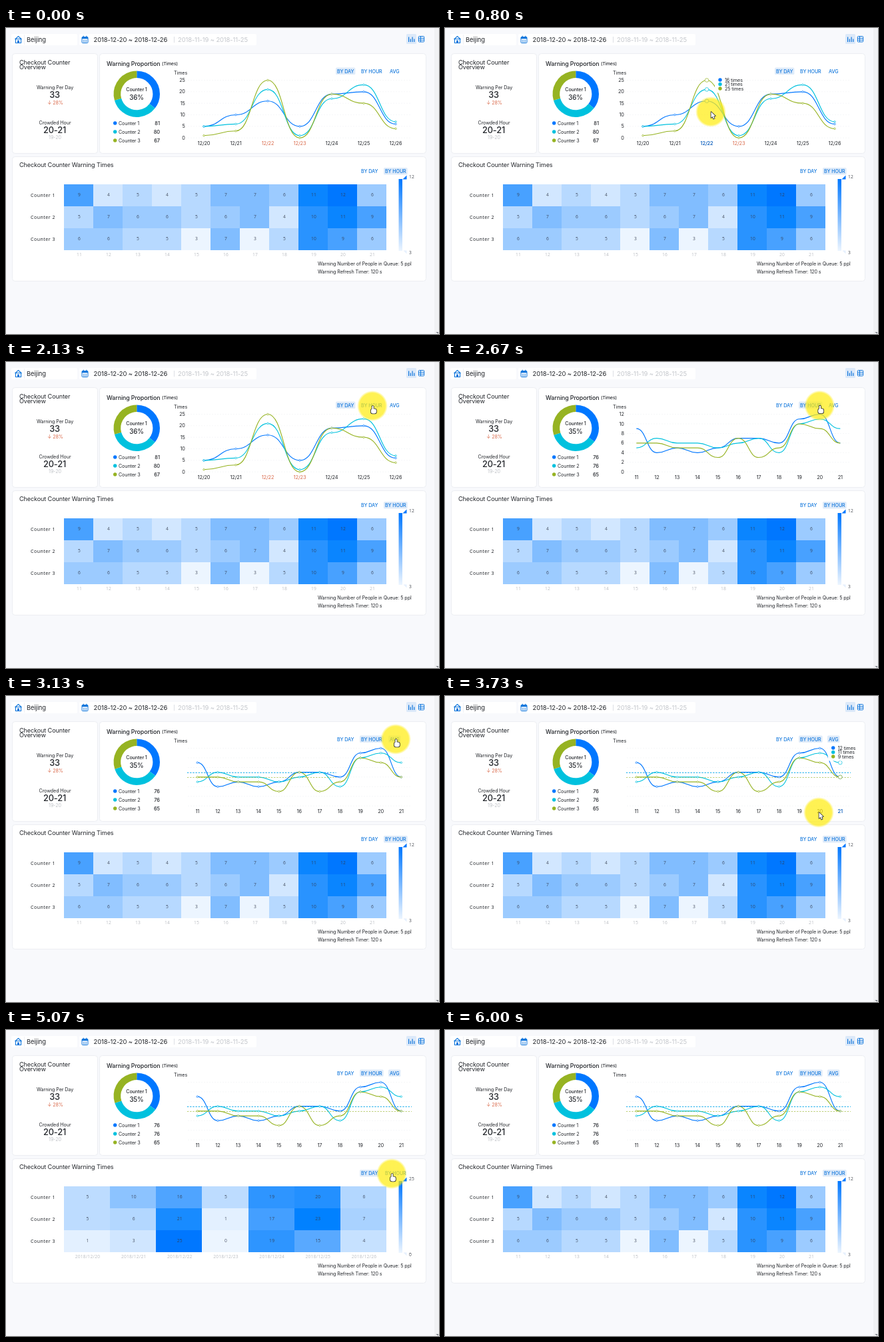
These frames come from a looping animation (650x460 px, 6130 ms). An HTML page with a canvas:

```html
<!DOCTYPE html>
<html lang="en">
<head>
<meta charset="utf-8">
<title>Checkout counter dashboard</title>
<style>
  html, body { margin: 0; width: 100%; height: 100%; overflow: hidden; background: #f8f9fc; }
  canvas { display: block; width: 650px; height: 460px; }
</style>
</head>
<body>
<canvas id="stage" width="650" height="460"></canvas>
<script>
const ctx = document.getElementById('stage').getContext('2d');
const LOOP = 6130, TICK = 1000 / 15;
const UI = 'Inter, sans-serif', GRID = '"Noto Sans", sans-serif';
const SMALL = 7.15, TITLE = 9.1, TRACKING = -0.013;
const INK = '#24272c', MUTED = '#bfc2c7', RED = '#d9694a', LINK = '#1277dc';
const COLORS = ['#0077ff', '#00c1de', '#96b322'];

const range = n => [...Array(n).keys()];
const sum = row => row.reduce((a, b) => a + b, 0);
const mix = (a, b, p) => a + (b - a) * p;
const phase = (t, from, to) => Math.max(0, Math.min(1, (t - from) / (to - from)));
const ease = p => p * p * (3 - 2 * p);

// Warnings per counter, by day and by hour
const day = {
  rows: [[5, 10, 16, 5, 19, 20, 6], [5, 6, 21, 1, 17, 23, 7], [1, 3, 25, 0, 19, 15, 4]],
  label: i => '12/' + (20 + i), date: i => '2018/12/' + (20 + i),
  weekend: i => i === 2 || i === 3,
  x0: 297, step: 48, min: 0, max: 25, tick: 5
};
const hour = {
  rows: [[9, 4, 5, 4, 5, 7, 7, 6, 11, 12, 6], [5, 7, 6, 6, 5, 6, 7, 4, 10, 11, 9],
         [6, 6, 5, 5, 3, 7, 3, 5, 10, 9, 6]],
  label: i => 11 + i, date: i => 11 + i, weekend: () => false,
  x0: 287.3, step: 30.6, min: 3, max: 12, tick: 2
};

// Pointer moves: start, end, and the point reached
const ENTRY = { x: 625, y: 171 };
const MOVES = [
  [266, 733, 399, 126], [933, 1600, 437, 128], [1600, 2133, 550, 66], [2533, 2867, 585, 65],
  [3533, 3733, 561, 175], [3733, 4200, 540, 216], [4733, 5067, 579, 216], [5667, 6000, 676, 221]
];

function pointer(t) {
  if (t < 266 || t > 5990) return null;
  return MOVES.reduce((c, [from, to, x, y]) => {
    const p = ease(phase(t, from, to));
    return { x: mix(c.x, x, p), y: mix(c.y, y, p) };
  }, ENTRY);
}

function text(s, x, cy, size = SMALL, o = {}) {
  ctx.font = `${o.weight || 400} ${size}px ${o.font || UI}`;
  ctx.letterSpacing = (o.space ?? TRACKING * size) + 'px';
  ctx.textAlign = o.align || 'left';
  ctx.fillStyle = o.color || INK;
  ctx.fillText(s, x, cy + size * 0.36);
}

const centered = (s, x, cy, size, o) => text(s, x, cy, size, { align: 'center', ...o });
const gridText = (s, x, cy, size, o) => text(s, x, cy, size, { font: GRID, space: 0.2, ...o });

function line(color, width) {
  ctx.strokeStyle = color;
  ctx.lineWidth = width;
  ctx.stroke();
}

function box(x, y, w, h, fill, r = 0, stroke) {
  ctx.beginPath();
  ctx.roundRect(x, y, w, h, r);
  ctx.fillStyle = fill;
  ctx.fill();
  if (stroke) line(stroke, 1);
}

function dot(x, y, r, fill, stroke, width) {
  ctx.beginPath();
  ctx.arc(x, y, r, 0, Math.PI * 2);
  ctx.fillStyle = fill;
  ctx.fill();
  if (stroke) line(stroke, width);
}

function rule(x, y, end, color, width, dash) {
  ctx.setLineDash(dash);
  ctx.beginPath();
  ctx.moveTo(x, y);
  ctx.lineTo(end, y);
  line(color, width);
  ctx.setLineDash([]);
}

function triangle(x, y, dx, dy, fill) {
  ctx.beginPath();
  ctx.moveTo(x, y);
  ctx.lineTo(x + dx, y);
  ctx.lineTo(x + dx, y + dy);
  ctx.fillStyle = fill;
  ctx.fill();
}

function button(label, x, cy, on) {
  ctx.font = `500 ${SMALL}px ${UI}`;
  ctx.letterSpacing = TRACKING * SMALL + 'px';
  if (on) box(x - 2, cy - 5.5, ctx.measureText(label).width + 4, 10.5, '#dfebf9', 1.5);
  text(label, x, cy, SMALL, { color: LINK, weight: 500 });
}

function header() {
  box(8, 9, 99, 17, '#fff', 2);
  box(110, 9, 266, 17, '#fff', 2);
  box(27, 10, 1, 15, '#eff1f5');

  // Home
  ctx.beginPath();
  ctx.moveTo(13.5, 17);
  ctx.lineTo(18.5, 12.5);
  ctx.lineTo(23.5, 17);
  ctx.rect(14.5, 16.5, 8, 6);
  line(LINK, 1.2);
  box(17, 18.5, 3, 4, LINK);
  text('Beijing', 31, 17.5, 9.4);

  // Calendar
  box(114, 13.5, 9, 9, '#fff', 1.2, LINK);
  box(114, 13.5, 9, 2.8, LINK);
  for (const i of range(2)) box(115.7 + i * 4.5, 11.8, 1.2, 2, LINK);
  for (const i of range(6)) box(115.8 + i % 3 * 2.1, 18 + (i > 2 ? 2 : 0), 1.2, 1.2, LINK);
  text('2018-12-20 ~ 2018-12-26', 131.5, 17.5, 9.45);
  box(252, 13, 0.8, 9, '#d5d8dd');
  text('2018-11-19 ~ 2018-11-25', 258, 17.5, 9.45, { color: '#c4c7cc' });

  // Chart and table switches
  box(601, 9, 15, 15, '#dce9f9', 1.5);
  for (const i of range(4)) {
    const h = i % 2 ? 4.5 : 7.5;
    box(604 + i * 2.75, 21 - h, 1.2, h, LINK);
  }
  box(619.3, 12.5, 8.4, 8.4, '#fff', 1, LINK);
  for (const i of range(2)) box(619, 14.8 + i * 2.8, 9, 1, LINK);
  box(622, 12.5, 1, 8.4, LINK);
}

function overview() {
  text('Checkout Counter', 20, 51.5, TITLE);
  text('Overview', 20, 59, TITLE);
  centered('Warning Per Day', 73.5, 89.5);
  centered('33', 73, 100.5, 12.8, { weight: 500 });
  centered('↓ 28%', 74, 112, SMALL, { color: RED });
  centered('Crowded Hour', 73.5, 142.5);
  centered('20-21', 73, 153.5, 12.8, { weight: 500 });
  centered('19-20', 73.5, 164.5, SMALL, { color: MUTED });
}

function donut(set, p) {
  const target = hour.rows.map(sum);
  const sums = day.rows.map((row, i) => mix(sum(row), target[i], p));
  let angle = -Math.PI / 2;
  sums.forEach((v, i) => {
    const end = angle + v / sum(sums) * Math.PI * 2;
    ctx.beginPath();
    ctx.arc(196.3, 99.2, 29.4, angle, end);
    line(COLORS[i], 10.6);
    angle = end;
  });
  const shown = set.rows.map(sum);
  centered('Counter 1', 196, 92.5, SMALL, { weight: 500 });
  centered(Math.round(shown[0] / sum(shown) * 100) + '%', 196, 105, 9.7, { weight: 500 });
  shown.forEach((v, i) => {
    const y = 143 + i * 13;
    dot(163.7, y, 2.7, COLORS[i]);
    text('Counter ' + (i + 1), 169, y);
    text(v, 231, y, 7.5, { align: 'right', weight: 500 });
  });
}

const plotX = (set, i) => set.x0 + i * set.step;
const plotY = (set, v) => 165.2 - v / set.max * 86.7;

function hovered(set, t) {
  const c = pointer(t);
  if (!c || c.y < 74 || c.y > 180 || c.x < 272 || c.x > 612) return -1;
  const i = Math.round((c.x - set.x0) / set.step);
  return Math.max(0, Math.min(set.rows[0].length - 1, i));
}

function curve(set, row, color) {
  ctx.beginPath();
  row.forEach((v, i) => {
    const x = plotX(set, i), y = plotY(set, v), m = x - set.step / 2;
    if (i) ctx.bezierCurveTo(m, plotY(set, row[i - 1]), m, y, x, y);
    else ctx.moveTo(x, y);
  });
  line(color, 1.15);
}

function tooltip(set, i) {
  const x = Math.min(plotX(set, i) + 12, 575);
  box(x, 71, 43, 26.5, 'rgba(255,255,255,.96)', 2);
  set.rows.forEach((row, n) => {
    const y = 78 + n * 6.5;
    dot(x + 8, y, 2.7, COLORS[n]);
    text(row[i] + ' times', x + 15, y);
  });
}

function chart(set, t) {
  const average = t >= 2930;
  const tip = hovered(set, t), trail = hovered(set, t - 2 * TICK);
  const focus = tip < 0 || trail < 0 ? tip : trail;   // the highlight lags behind the tooltip
  text('Times', 252, 67);
  for (let v = 0; v <= set.max; v += set.tick) {
    const y = plotY(set, v);
    rule(273, y, 609, '#f3f4f6', 0.7, [2, 2]);
    if (!average) text(v, 268.8, y, 7.3, { align: 'right' });
  }
  for (const i of range(set.rows[0].length)) {
    const on = i === focus;
    centered(set.label(i), plotX(set, i), 173.3, 7.4,
      { weight: on ? 600 : 400, color: on ? '#1766c0' : set.weekend(i) ? RED : INK });
  }

  ctx.save();
  ctx.beginPath();
  ctx.rect(270, 70, set === hour ? 342 * phase(t, 2200, 2600) : 342, 100);
  ctx.clip();
  set.rows.forEach((row, i) => curve(set, row, COLORS[i]));
  ctx.restore();

  if (average) set.rows.forEach((row, i) => {
    const end = mix(272, 609, phase(t, 2870, 3267));
    rule(272, plotY(set, sum(row) / row.length), end, COLORS[i], 0.65, [2.2, 2]);
  });
  if (set === day || t >= 2790) set.rows.forEach((row, n) => row.forEach((v, i) => {
    const on = i === focus;
    dot(plotX(set, i), plotY(set, v), on ? 2.8 : 1.3, '#fff', COLORS[n], 0.7);
  }));
  if (tip >= 0) tooltip(set, tip);
}

function shade(v, set) {
  const p = (v - set.min) / (set.max - set.min);
  return `rgb(${Math.max(0, 236 * (1 - p - 0.1 * p ** 3))},${mix(245, 119, p)},255)`;
}

function heat(set, alpha) {
  const n = set.rows[0].length;
  const edge = i => Math.floor(87.5 + i * 484 / n);
  const middle = i => 88 + (i + 0.5) * 484 / n;
  ctx.save();
  ctx.globalAlpha = alpha;
  box(86, 336, 528, 9, '#fff');
  box(604, 219, 10, 10, '#fff');
  set.rows.forEach((row, r) => row.forEach((v, i) => {
    const y = 235 + r * 33;
    box(edge(i), y, edge(i + 1) - edge(i), 33, shade(v, set));
    gridText(v, middle(i), y + 16, 6.7, { align: 'center', color: 'rgba(50,58,75,.8)' });
  }));
  for (const i of range(n)) gridText(set.date(i), middle(i), 340.5, 6.7, { align: 'center', color: MUTED });
  gridText(set.max, 605, 224, 6.7, { color: '#55595f' });
  gridText(set.min, 605, 338, 6.7, { color: '#55595f' });
  ctx.restore();
}

function heatPanel(t) {
  const byDay = t >= 4330 && t < 5260;
  text('Checkout Counter Warning Times', 20, 206, TITLE);
  button('BY DAY', 533, 215.5, byDay);
  button('BY HOUR', 569, 215.5, !byDay);
  for (const r of range(3)) gridText('Counter ' + (r + 1), 37, 251 + r * 33, 7, { space: 0.5 });

  const fade = phase(t, 4267, 4467) * (1 - phase(t, 5200, 5333));
  heat(hour, 1);
  if (fade > 0) heat(day, fade);

  const bar = ctx.createLinearGradient(0, 227, 0, 335);
  bar.addColorStop(0, shade(hour.max, hour));
  bar.addColorStop(1, shade(hour.min, hour));
  box(589.5, 227, 5.5, 108, bar);
  triangle(595.5, 227.5, 6, -6, COLORS[0]);
  triangle(596.5, 334.5, 5, 5, '#e6f0fd');
  text('Warning Number of People in Queue: 5 ppl', 468, 354.5);
  text('Warning Refresh Timer: 120 s', 468, 366.5);
}

function arrow() {
  ctx.beginPath();
  ctx.moveTo(0, 0);
  ctx.lineTo(0, 9);
  ctx.lineTo(2.1, 7.1);
  ctx.lineTo(3.6, 10.6);
  ctx.lineTo(5.1, 9.9);
  ctx.lineTo(3.7, 6.6);
  ctx.lineTo(6.4, 6.3);
  ctx.closePath();
}

function hand() {
  ctx.beginPath();
  ctx.roundRect(-1, 0, 2.2, 8, 1);
  ctx.roundRect(-2.6, 4.6, 8, 6.8, 2.4);
}

function drawPointer(t) {
  const c = pointer(t);
  if (!c) return;
  const glow = ctx.createRadialGradient(c.x, c.y, 0, c.x, c.y, 23);
  glow.addColorStop(0, 'rgba(255,236,10,.7)');
  glow.addColorStop(0.84, 'rgba(255,236,10,.7)');
  glow.addColorStop(1, 'rgba(255,236,10,0)');
  dot(c.x, c.y, 23, glow);

  const onButton = c.x > 530 && c.x < 604 && (Math.abs(c.y - 65) < 7 || Math.abs(c.y - 216) < 7);
  ctx.save();
  ctx.translate(c.x + 0.5, c.y);
  ctx.lineJoin = 'round';
  onButton ? hand() : arrow();
  line('#26282c', 1.6);
  ctx.fillStyle = '#fff';
  ctx.fill();
  ctx.restore();
}

function draw(t) {
  const set = t < 2260 ? day : hour;
  box(0, 0, 650, 460, '#f8f9fc');
  box(643, 0, 7, 460, '#f1f2f4');
  triangle(645, 457, 4, 2.5, '#777b82');
  header();
  box(9.5, 38.5, 128, 150, '#fff', 4, '#eceef2');
  box(140.5, 38.5, 490, 150, '#fff', 4, '#eceef2');
  box(9.5, 193.5, 621, 187, '#fff', 4, '#eceef2');
  overview();
  text('Warning Proportion', 151, 53.5, 8.9, { weight: 500 });
  text('(Times)', 234, 54, 6.7, { weight: 500 });
  button('BY DAY', 497, 65, set === day);
  button('BY HOUR', 533, 65, set === hour);
  button('AVG', 576, 65, t >= 2860);
  donut(set, phase(t, 2200, 2533));
  chart(set, t);
  heatPanel(t);
  drawPointer(t);
}

function frame() {
  const t = performance.now() % LOOP;
  draw(Math.floor((t + 4) / TICK) * TICK);
  requestAnimationFrame(frame);
}
frame();
</script>
</body>
</html>
```
